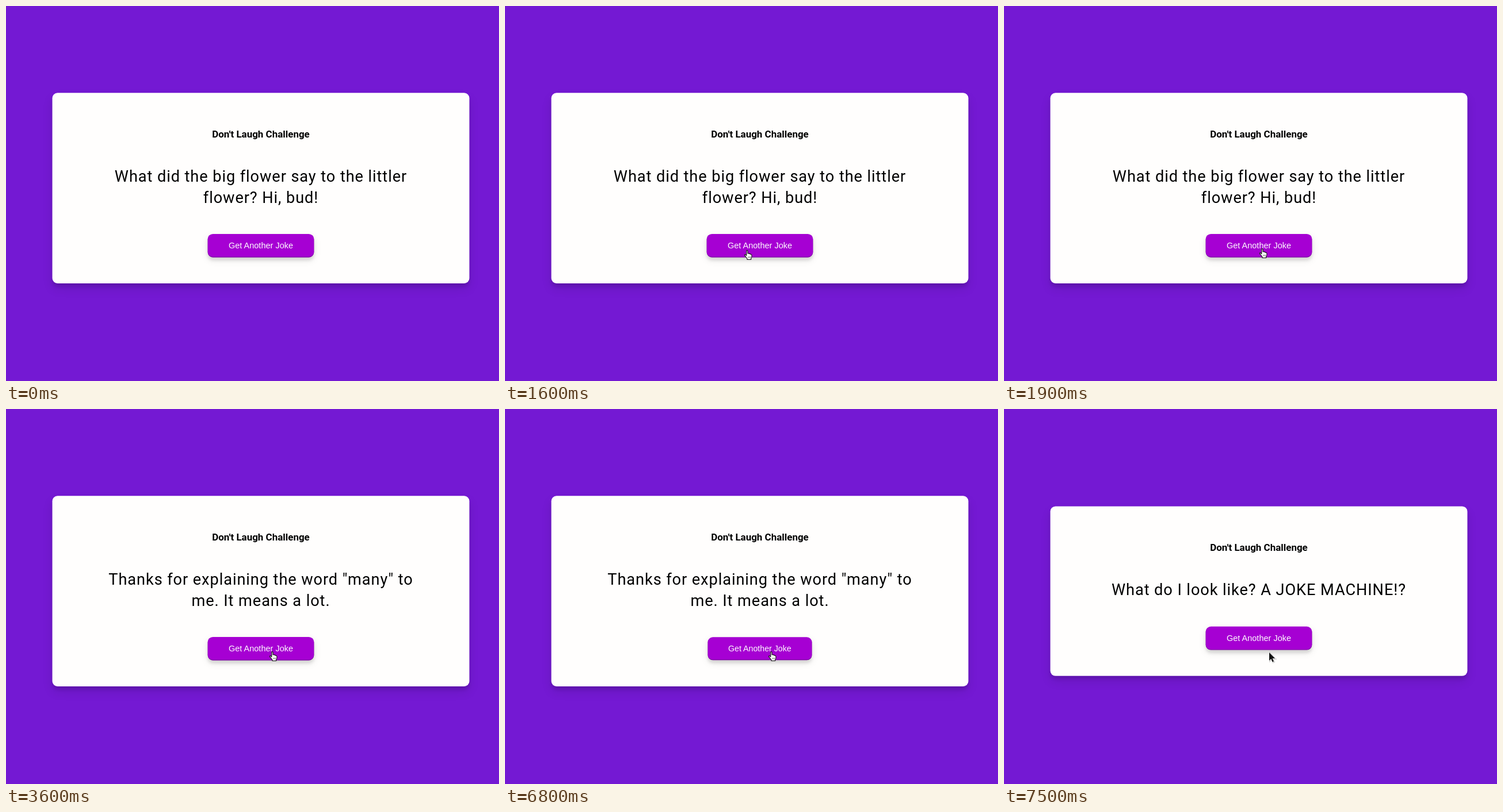
Write an HTML page that moves like this. It is 857 px wide and 653 px high and loops after 8000 ms.

```html
<!DOCTYPE html>
<html lang="en">
<head>
<meta charset="utf-8">
<title>Joke card</title>
<style>
  html, body { margin: 0; width: 100%; height: 100%; overflow: hidden; background: #7419d3; }
  .card {
    position: absolute; left: 443px; top: 317px; width: 800px; padding: 50px 20px;
    box-sizing: border-box; transform: translate(-50%, -50%) scale(.90625);
    background: #fffefd; border-radius: 10px; text-align: center; color: #000;
    font-family: Roboto, sans-serif;
    box-shadow: 0 10px 20px rgba(0,0,0,.1), 0 6px 6px rgba(0,0,0,.1);
  }
  h3 { margin: 18.72px 0 0; font-size: 18.72px; line-height: 22px; font-weight: 700; }
  .joke {
    margin: 50px 0; font-size: 30px; line-height: 40px; letter-spacing: 1px;
    white-space: pre;
  }
  .btn {
    display: block; margin: 0 auto; width: max-content; height: 45px; padding: 0 40px;
    font: 16px/45px "Liberation Sans", Arial, sans-serif; color: #fff;
    background: #a600d3; border-radius: 10px;
    box-shadow: 0 5px 15px rgba(0,0,0,.1), 0 6px 6px rgba(0,0,0,.1),
      inset 0 -1px 1px rgba(50,0,80,.45);
  }
  svg { position: absolute; left: 0; top: 0; width: 24px; height: 24px; overflow: visible; }
</style>
</head>
<body>
<div class="card">
  <h3>Don't Laugh Challenge</h3>
  <div class="joke" id="joke"></div>
  <div class="btn" id="btn">Get Another Joke</div>
</div>
<svg id="arrow">
  <path d="M0 0V14.2L3.3 11.1L5.6 16.4L8 15.4L5.7 10.2H10.2Z" transform="translate(1 1)" fill="none" stroke="#000" stroke-opacity=".18" stroke-width="2"/>
  <path d="M0 0V14.2L3.3 11.1L5.6 16.4L8 15.4L5.7 10.2H10.2Z" fill="#111" stroke="#fff" stroke-width="1.1" paint-order="stroke"/>
</svg>
<svg id="hand">
  <g transform="translate(-3.5 -2)">
    <path d="M4.3 1.7Q4.3.6 5.4.6Q6.5.6 6.5 1.7V6Q8.5 5.3 9 6.6Q10.8 6 11.2 7.4Q13.3 7 13.4 9V11.5Q13.2 13 12.2 14.5V16.5H5.5V15L3.2 11.8L.9 9.2Q.5 7.8 2 7.8L4.3 9.6Z" fill="#fff" stroke="#111" stroke-width="1.1" stroke-linejoin="round"/>
    <path d="M7.3 11V14M9.2 11V14M11 11V14" stroke="#333" stroke-width=".6"/>
  </g>
</svg>
<script>
const LOOP = 8000, TICK = 100;
const JOKES = [
  [0, "What did the big flower say to the littler\nflower? Hi, bud!"],
  [3600, "Thanks for explaining the word \"many\" to\nme. It means a lot."],
  [7500, "What do I look like? A JOKE MACHINE!?"]
];
const $ = id => document.getElementById(id);
const joke = $("joke"), btn = $("btn"), arrow = $("arrow"), hand = $("hand");
const mix = (a, b, u) => a + (b - a) * u;

function bezier(a, b, c, d, u) {
  const v = 1 - u;
  return v * v * v * a + 3 * v * v * u * b + 3 * v * u * u * c + u * u * u * d;
}

// Pointer tip: swings up from below, then settles on the button.
function pointer(t) {
  if (t < 1600) {
    const s = Math.max(0, (t - 1000) / 600), u = s * (1.6 - .6 * s);
    return [bezier(441, 430, 345, 419, u), bezier(583, 540, 440, 427, u)];
  }
  if (t < 2000) {
    const u = (t - 1600) / 300;
    return [mix(419, 447, u), mix(427, 424, u)];
  }
  return [t < 2400 ? 457 : 461, 424];
}

function place(el, on, x, y) {
  el.style.visibility = on ? "visible" : "hidden";
  el.style.transform = `translate(${Math.round(x)}px, ${Math.round(y)}px)`;
}

let shown = "";
function draw(now) {
  const t = Math.floor((now % LOOP) / TICK) * TICK;
  const text = JOKES.filter(j => j[0] <= t).pop()[1];
  if (text !== shown) joke.textContent = shown = text;
  btn.style.transform = t >= 6800 && t < 7100 ? "scale(.98)" : "none";

  const [x, y] = pointer(t);
  const over = y < 437 && t < 7500;
  place(arrow, t >= 900 && !over, x, y);
  place(hand, t >= 900 && over, x, y);
}

function loop(now) {
  draw(now);
  requestAnimationFrame(loop);
}
draw(0);
requestAnimationFrame(loop);
</script>
</body>
</html>
```
